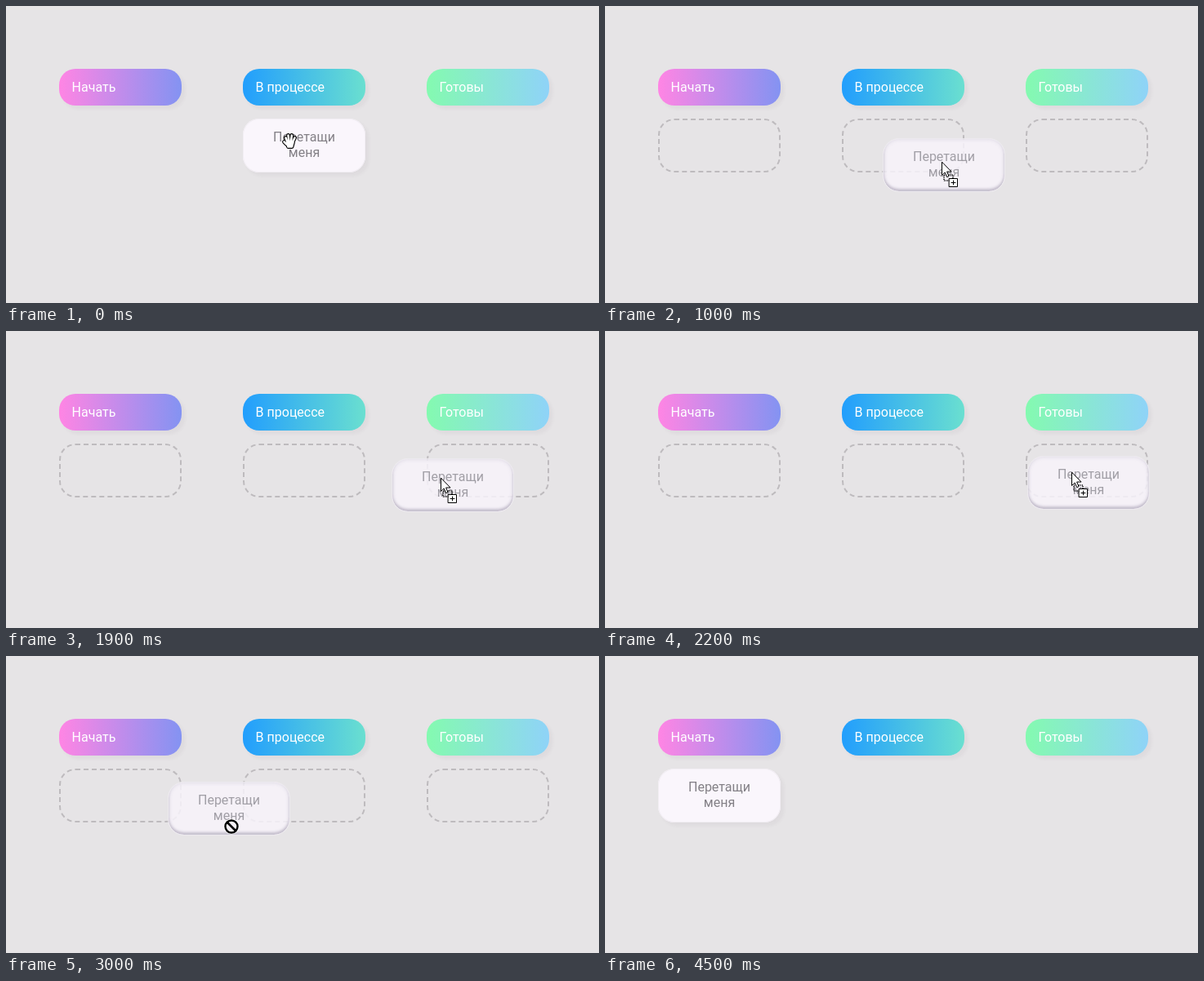
An HTML page for the animation above (4.6 s loop, 726 by 364 pixels).

```html
<!DOCTYPE html>
<html lang="ru">
<head>
<meta charset="utf-8">
<style>
html, body { margin: 0; width: 100%; height: 100%; overflow: hidden; background: #e6e4e6; }
body { position: relative; font: 16px/19px Roboto, Arial, sans-serif; }
div { position: absolute; box-sizing: border-box; width: 150px; border-radius: 20px; }
.head { top: 77px; height: 45px; padding: 13px 15.6px; color: #fff; box-shadow: 4px 4px 4px rgba(70, 50, 70, .05); }
.slot { top: 138px; height: 66px; border: 2px dashed #bebbbe; }
#card {
  height: 66px; padding-top: 13px; text-align: center; color: #838086; background: #faf6fc;
  box-shadow: inset 0 0 0 1px #f2eef4, 4px 4px 4px rgba(70, 50, 70, .05);
}
#card.ghost {
  opacity: .84; color: #95929a; background: #f8f4fb;
  border: 1px solid #eeebf0; padding-top: 12px;
  box-shadow: inset 0 -3px 3px rgba(110, 100, 130, .34), inset 0 0 5px rgba(110, 100, 130, .22);
}
svg { position: absolute; left: 0; top: 0; width: 726px; height: 364px; }
#cursor path, #cursor rect { fill: #fff; stroke: #000; stroke-linejoin: round; stroke-linecap: round; }
#cursor .line { fill: none; }
#cursor .edge { stroke-width: 4.8; }
#cursor .skin { stroke: #fff; stroke-width: 2.6; }
</style>
</head>
<body>
<div id="card">Перетащи<br>меня</div>
<svg viewBox="0 0 726 364">
  <defs>
    <path id="openHand" d="M-2.5 2L-4.5-3.5M-.5 1L-1.5-6.5M2 1L2.8-6.5M4 2L6.5-3.5M-3.5 4.5L-6.5 1.5M-3 3L4.5 2L3 7.5H-1.5Z"/>
    <path id="closedHand" d="M-2.8 1V-3M.1 0V-4.2M3 0V-3.8M5.2 1V-2.4M-3 3L-4.4 1.2M-2.8 1.5H5L3.5 5.5H-1.5Z"/>
  </defs>
  <g id="cursor">
    <g id="open"><use href="#openHand" class="edge"/><use href="#openHand" class="skin"/></g>
    <g id="fist"><use href="#closedHand" class="edge"/><use href="#closedHand" class="skin"/></g>
    <g id="copy">
      <rect class="line" x="3" y="16" width="11" height="7" stroke-width="1.6" stroke-dasharray="1 1" style="stroke-linecap: butt"/>
    </g>
    <g id="arrow"><path d="M.5.5V16.5L4.2 13L6.7 18.7L9 17.7L6.6 12H11.7Z"/></g>
    <g id="plus">
      <rect x="9.5" y="20.5" width="10" height="10"/>
      <path class="line" d="M12 25.5H17M14.5 23V28"/>
    </g>
    <g id="denied" fill="none">
      <circle r="7.5" stroke="#fff" stroke-width="4"/>
      <circle r="7.5" stroke="#000" stroke-width="2.4"/>
      <path class="line" stroke-width="2.6" d="M-5-5L5 5"/>
    </g>
  </g>
</svg>
<script>
const LOOP = 4600, STEP = 100, CARD_W = 150, CARD_H = 66, SLOT_Y = 138;
const columns = [
  { x: 65, title: 'Начать', fill: '#ff85e4, #229efd 179%' },
  { x: 290, title: 'В процессе', fill: '#229efd, #6adfd0' },
  { x: 515, title: 'Готовы', fill: '#84fab0, #8fd3f8' }
];
const [first, second, third] = columns;

// Each move eases to a point; bow bends it downwards on the way.
const move = (start, end, x, y, bow = 0) => ({ start, end, x, y, bow });
const pointerMoves = [
  move(710, 1400, 517, 183, 20.5),
  move(1700, 2300, 575, 172),
  move(2300, 2500, 585, 186),
  move(2740, 3140, 155, 190, 26),
  move(3140, 3500, 145, 185),
  move(3500, 3900, 511, 345)
];
const drags = [
  { start: 800, drop: 2300, from: second, to: third,
    moves: [move(770, 1400, 454, 157, 22), move(1700, 2300, 522, 153)] },
  { start: 2800, drop: 3300, from: third, to: first,
    moves: [move(2740, 3140, 73, 144, 15)] }
];

const byId = id => document.getElementById(id);
const card = byId('card'), cursor = byId('cursor');
const smooth = u => u * u * (3 - 2 * u);
const within = (px, py, x, y) => px >= x && px <= x + CARD_W && py >= y && py <= y + CARD_H;

// The <use> outlines take their paint from these rules on the shared shapes.
for (const use of document.querySelectorAll('use')) {
  const shape = document.querySelector(use.getAttribute('href')).cloneNode();
  shape.removeAttribute('id');
  shape.setAttribute('class', use.getAttribute('class'));
  use.replaceWith(shape);
}

function addBox(className, x, text = '') {
  const box = document.createElement('div');
  box.className = className;
  box.style.left = x + 'px';
  box.textContent = text;
  document.body.insertBefore(box, card);
  return box;
}

const slots = columns.map(({ x, title, fill }) => {
  addBox('head', x, title).style.backgroundImage = `linear-gradient(90deg, ${fill})`;
  return addBox('slot', x);
});

function follow(x, y, moves, t) {
  for (const m of moves) {
    if (t <= m.start) break;
    const k = smooth(Math.min(1, (t - m.start) / (m.end - m.start)));
    x += (m.x - x) * k;
    y += (m.y - y) * k + m.bow * Math.sin(Math.PI * k);
  }
  return [Math.round(x), Math.round(y)];
}

function cursorParts(t, drag, x, y, left, top) {
  if (t >= 3900) return [];
  if (drag) {
    const overSlot = columns.some(c => within(x, y, c.x, SLOT_Y));
    return overSlot ? ['copy', 'arrow', 'plus'] : ['denied'];
  }
  if (!within(x, y, left, top)) return ['arrow'];
  const pressed = drags.some(d => t >= d.start - 2 * STEP && t < d.start);
  return [pressed ? 'fist' : 'open'];
}

function render(time) {
  const t = Math.floor((time % LOOP) / STEP) * STEP;
  const drag = drags.find(d => t >= d.start && t < d.drop);
  const home = drags.reduce((column, d) => t >= d.drop ? d.to : column, second);
  const [left, top] = follow(home.x, SLOT_Y, drag ? drag.moves : [], t);
  const [x, y] = follow(347, 165, pointerMoves, t);

  card.className = drag ? 'ghost' : '';
  card.style.left = left + 'px';
  card.style.top = top + 'px';
  for (const slot of slots) slot.style.visibility = drag ? 'visible' : 'hidden';

  const parts = cursorParts(t, drag, x, y, left, top);
  for (const part of cursor.children) {
    part.style.display = parts.includes(part.id) ? 'inline' : 'none';
  }
  cursor.setAttribute('transform', `translate(${x} ${y})`);
}

const start = performance.now();
function tick() {
  render(performance.now() - start);
  requestAnimationFrame(tick);
}
tick();
</script>
</body>
</html>
```
